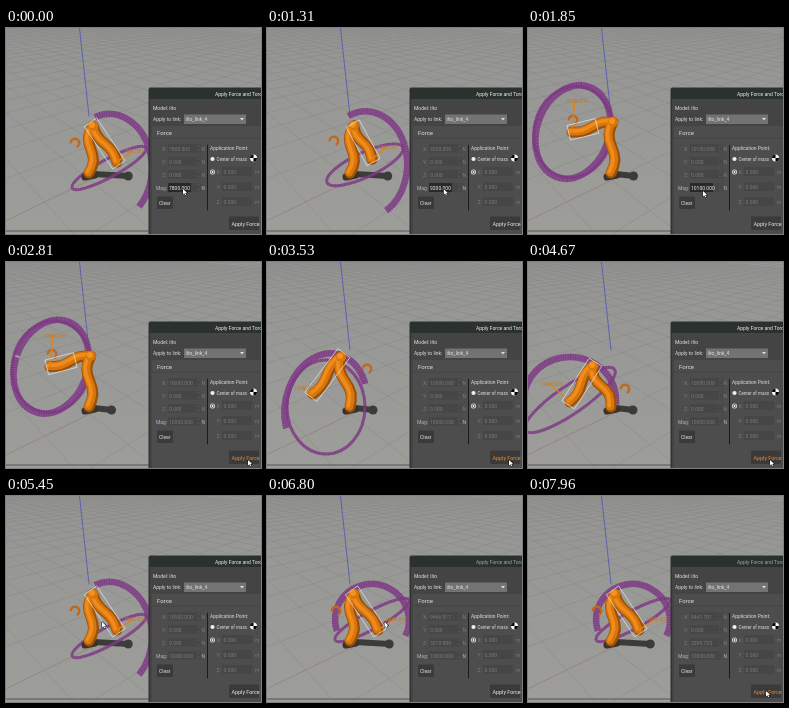
These frames come from a looping animation (255x206 px, 8 s). An HTML page with a canvas:

```html
<!DOCTYPE html>
<html lang="en">
<head>
<meta charset="utf-8">
<title>Apply force</title>
<style>
html, body { margin: 0; width: 100%; height: 100%; overflow: hidden; background: #999997; }
canvas { display: block; width: 255px; height: 206px; }
</style>
</head>
<body>
<canvas id="stage"></canvas>
<script>
const LOOP = 8000, W = 255, H = 206;
const canvas = document.getElementById('stage');
const ratio = window.devicePixelRatio || 1;
canvas.width = W * ratio;
canvas.height = H * ratio;
const ctx = canvas.getContext('2d');
ctx.scale(ratio, ratio);

const BASE = [83, 145];
const ORIGIN = [84, 152];
const VANISH_X = [470, -35];
const VANISH_Y = [-150, -35];

// ring and band: radius x, radius y, tilt; arc: start and end angle of the ring.
const rest = {
  elbow: [87, 98], hand: [111, 134], boxStart: [-0.1], centre: [103, 140],
  ring: [43, 54, 0], arc: [-1.9, 0.8], band: [42, 9, -0.5],
  curl: [69, 115], tip: [127, 123]
};
const settled = { ...rest, centre: [105, 124], ring: [37, 36, 0.25], arc: [-3.7, 0.2] };
const left = {
  elbow: [85, 94], hand: [44, 104], boxStart: [0.4], centre: [45, 104],
  ring: [36, 48, 0.35], arc: [-3.14, 3.14], band: [39, 46, 0.2],
  curl: [45, 92], tip: [47, 73]
};
const front = {
  elbow: [74, 95], hand: [46, 132], boxStart: [-0.1], centre: [59, 145],
  ring: [41, 54, 0.2], arc: [-3.7, -0.6], band: [39, 47, 0],
  curl: [100, 107], tip: [36, 126]
};
const low = {
  elbow: [65, 104], hand: [42, 140], boxStart: [-0.1], centre: [42, 138],
  ring: [46, 43, 0], arc: [-3.3, 0.1], band: [54, 14, -0.6],
  curl: [97, 127], tip: [22, 122]
};

const swing = [
  [1190, rest], [1850, left], [2300, low], [2750, left], [3530, front],
  [3950, left], [4670, low], [4980, left], [5450, rest], [6050, settled]
];
const pointer = [
  [1190, [177, 161]], [1850, [175, 163]], [2030, [175, 163]], [2600, [242, 198]],
  [5330, [242, 198]], [5450, [96, 126]], [6240, [98, 127]], [6600, [117, 125]],
  [7520, [121, 132]], [7720, [121, 132]], [7940, [238, 195]]
];

const mix = (a, b, k) => a.map((v, i) => v + (b[i] - v) * k);
const clamp = v => Math.max(0, Math.min(1, v));

function sample(keys, t, blend) {
  const next = keys.findIndex(key => key[0] > t);
  if (next === 0) return keys[0][1];
  if (next < 0) return keys[keys.length - 1][1];
  const [t0, a] = keys[next - 1], [t1, b] = keys[next];
  const k = (t - t0) / (t1 - t0);
  return blend(a, b, k * k * (3 - 2 * k));
}

function mixPose(a, b, k) {
  const pose = {};
  for (const part in a) pose[part] = mix(a[part], b[part], k);
  return pose;
}

function magnitude(t) {
  if (t >= 1970) return 10000;
  const steps = (start, gap, count) =>
    t < start ? 0 : Math.min(count, Math.floor((t - start) / gap) + 1);
  return 7800 + 100 * (steps(60, 60, 2) + steps(310, 95, 3) +
    steps(690, 60, 6) + steps(1190, 60, 12));
}

function line(points, color, width, close) {
  ctx.beginPath();
  for (const [x, y] of points) ctx.lineTo(x, y);
  if (close) ctx.closePath();
  ctx.strokeStyle = color;
  ctx.lineWidth = width;
  ctx.stroke();
}

function rect(x, y, w, h, color, radius = 0) {
  ctx.beginPath();
  ctx.roundRect(x, y, w, h, radius);
  ctx.fillStyle = color;
  ctx.fill();
}

function dot(x, y, r, color) {
  ctx.beginPath();
  ctx.arc(x, y, r, 0, 7);
  ctx.fillStyle = color;
  ctx.fill();
}

function text(str, x, y, color = '#e4e4e4', size = 5) {
  ctx.font = `${size}px Roboto, sans-serif`;
  ctx.fillStyle = color;
  ctx.fillText(str, x, y);
}

// Point n cells along the floor axis that runs towards a vanishing point.
function alongAxis(vanish, cell, n) {
  return mix(ORIGIN, vanish, cell * n / (1 + cell * n));
}

function drawFloor() {
  const shade = ctx.createLinearGradient(0, 0, 0, H);
  shade.addColorStop(0, '#959593');
  shade.addColorStop(1, '#9d9d9a');
  rect(0, 0, W, H, shade);
  for (let n = -6; n <= 24; n++) {
    const alongX = alongAxis(VANISH_X, 0.105, n);
    const alongY = alongAxis(VANISH_Y, 0.14, n);
    line([VANISH_Y, mix(VANISH_Y, alongX, 5)], '#878785', 0.5);
    line([VANISH_X, mix(VANISH_X, alongY, 5)], '#878785', 0.5);
  }
  line([ORIGIN, mix(VANISH_X, ORIGIN, 2)], '#a3827e', 0.7);
  rect(0, 202.5, W, 1, '#555');
}

function drawRing([x, y], [rx, ry, tilt], [start, end], width) {
  ctx.beginPath();
  ctx.ellipse(x, y, rx, ry, tilt, start, end);
  ctx.lineCap = 'butt';
  ctx.lineWidth = width;
  ctx.strokeStyle = 'rgba(132, 62, 138, 0.8)';
  ctx.stroke();
  ctx.setLineDash([0.8, 1.6]);
  ctx.strokeStyle = 'rgba(104, 42, 112, 0.5)';
  ctx.stroke();
  ctx.setLineDash([]);
  ctx.lineCap = 'round';
}

// A link bulges to alternate sides, like the joint housings it stands for.
function linkPoints([x0, y0], [x1, y1], bulge) {
  const length = Math.hypot(x1 - x0, y1 - y0) || 1;
  return Array.from({ length: 9 }, (_, i) => {
    const side = bulge * Math.sin(i / 4 * Math.PI) / length;
    const [x, y] = mix([x0, y0], [x1, y1], i / 8);
    return [x - (y1 - y0) * side, y + (x1 - x0) * side];
  });
}

function drawBox([x0, y0], [x1, y1]) {
  const length = Math.hypot(x1 - x0, y1 - y0) || 1;
  const nx = -(y1 - y0) / length * 7.5, ny = (x1 - x0) / length * 7.5;
  line([[x0 + nx, y0 + ny], [x1 + nx, y1 + ny], [x1 - nx, y1 - ny], [x0 - nx, y0 - ny]],
    '#e8e8e8', 0.7, true);
}

function drawRobot(pose, label) {
  const { elbow, hand, tip, curl } = pose;
  const shadowEnd = [112 + (hand[0] - 70) * 0.25, 148];
  ctx.lineCap = ctx.lineJoin = 'round';
  line([[88, 146], shadowEnd], '#3b3b3a', 6);
  dot(...shadowEnd, 4.5, '#3b3b3a');
  line([[73.5, 0], [83, 88]], '#4c56bb', 0.8);
  drawRing(pose.centre, pose.ring, pose.arc, 6.5);
  drawRing(pose.centre, pose.band, [0, 6.28], 3);
  line([[79, 149], [89, 147]], '#39332c', 7);

  const arm = [...linkPoints(BASE, elbow, 3.5), ...linkPoints(elbow, hand, 2)];
  line(arm, '#9c5109', 11);
  line(arm.map(([x, y]) => [x - 0.8, y - 0.6]), '#d8760d', 8);
  line(arm.map(([x, y]) => [x - 1.8, y - 1.2]), '#f08c1b', 3.5);
  dot(...elbow, 5, '#d8760d');
  dot(elbow[0] - 1, elbow[1] - 1, 3, '#f3931f');
  ctx.beginPath();
  ctx.arc(...curl, 4.3, 3.3, 7.2);
  ctx.strokeStyle = '#bd6a1c';
  ctx.lineWidth = 2.4;
  ctx.stroke();
  line([hand, tip], '#e08018', 1.3);
  drawBox(mix(elbow, hand, pose.boxStart[0]), mix(elbow, hand, 1.08));
  text(label, tip[0] - 9, tip[1] + 2, '#c67822', 4.5);
}

function drawRow(name, value, y, x, unit, unitX, color) {
  text(name, x, y, color);
  text(value, x + 7, y, color);
  text(unit, unitX, y, color);
}

function drawSpinner(y) {
  rect(162, y, 33, 8.5, '#464646');
  for (const side of [-1, 1]) {
    const mid = y + 4.2 + side * 1.6;
    line([[191, mid], [192.5, mid + side * 1.4], [194, mid]], '#626262', 0.6);
  }
}

function drawMassIcon(x, y) {
  dot(x, y, 3.5, '#f5f5f5');
  ctx.fillStyle = '#050505';
  for (const start of [0, Math.PI]) {
    ctx.beginPath();
    ctx.moveTo(x, y);
    ctx.arc(x, y, 3.5, start, start + Math.PI / 2);
    ctx.fill();
  }
}

function drawDialog(t, mag) {
  const dim = '#7c7c7c', light = '#e0e0e0';
  rect(142.5, 59.5, 120, 150, '#303433', 2);
  rect(144, 71, 111, 135, '#434443');
  rect(143, 60, 112, 11, '#2b312f', [2, 0, 0, 0]);
  text('Apply Force and Torque', 209, 68, t < 5510 ? '#f0f0f0' : '#a3a7a4');
  text('Model: ilto', 147, 82, light);
  text('Apply to link:', 147, 93, light);
  rect(178, 86.5, 62, 9.5, '#737373');
  text('ilto_link_4', 179.5, 93, light);
  ctx.beginPath();
  ctx.moveTo(234, 90);
  ctx.lineTo(238, 90);
  ctx.lineTo(236, 92.5);
  ctx.fillStyle = '#ddd';
  ctx.fill();

  rect(146, 98, 109, 108, '#4d4d4d');
  text('Force', 151, 106.5, light, 6);
  line([[146, 110], [255, 110]], '#424242', 0.8);

  const drag = clamp((t - 6800) / 720);
  const force = mag.toFixed(3);
  const x = t < 6800 ? force : (9466.952 - 25.251 * drag).toFixed(3);
  const z = t < 6800 ? '0.000' : (3219.775 + 79.95 * drag).toFixed(3);
  [['X:', x], ['Y:', '0.000'], ['Z:', z]].forEach(([name, value], i) => {
    const left = 123 + i * 13, right = 146 + i * 15;
    drawSpinner(left - 7);
    drawRow(name, value, left, 156, 'N', 195.5, dim);
    rect(216, right - 7, 30, 9, '#464646');
    drawRow(name, '0.000', right, 210.5, 'm', 249, dim);
  });
  const focused = t < 2030;
  drawSpinner(155);
  if (focused) rect(162, 155, 23, 9, '#292929');
  text('Mag:', 150, 162, '#b5b5b5');
  text(force, 163, 162, focused ? '#f4f4f4' : dim);
  text('N', 195.5, 162, '#b5b5b5');
  rect(151, 168.5, 16, 12.5, '#3a3a3a', 1);
  text('Clear', 153, 176.5, light);
  line([[201.5, 117], [201.5, 182]], '#1b1b1b', 1);

  text('Application Point:', 204, 122, light, 4.9);
  dot(206.5, 131, 2.1, '#f0f0f0');
  text('Center of mass', 210.5, 133, light, 4.5);
  drawMassIcon(247.5, 130);
  dot(206.5, 144, 2.5, '#ededed');
  dot(206.5, 144, 1.8, '#303030');
  dot(206.5, 144, 1.1, '#fff');

  const hover = (t >= 2500 && t < 5360) || t >= 7880;
  rect(223, 188.5, 30, 13.5, '#3a3a3a', 1);
  text('Apply Force', 225.5, 197.5, hover ? '#ec8a2c' : '#ececec', 5.4);
}

function drawPointer([x, y]) {
  const outline = [[0, 0], [0, 5.4], [1.3, 4.3], [2.2, 6.2], [3.1, 5.8], [2.3, 4], [4, 3.8]];
  line(outline, '#111', 1, true);
  ctx.fillStyle = '#fff';
  ctx.fill();
}

function draw(now) {
  const t = now % LOOP;
  const mag = magnitude(t);
  drawFloor();
  drawRobot(sample(swing, t, mixPose), mag.toFixed(3));
  drawDialog(t, mag);
  const [x, y] = sample(pointer, t, mix);
  ctx.save();
  ctx.translate(x, y);
  drawPointer([x, y]);
  ctx.restore();
  requestAnimationFrame(draw);
}
requestAnimationFrame(draw);
</script>
</body>
</html>
```
